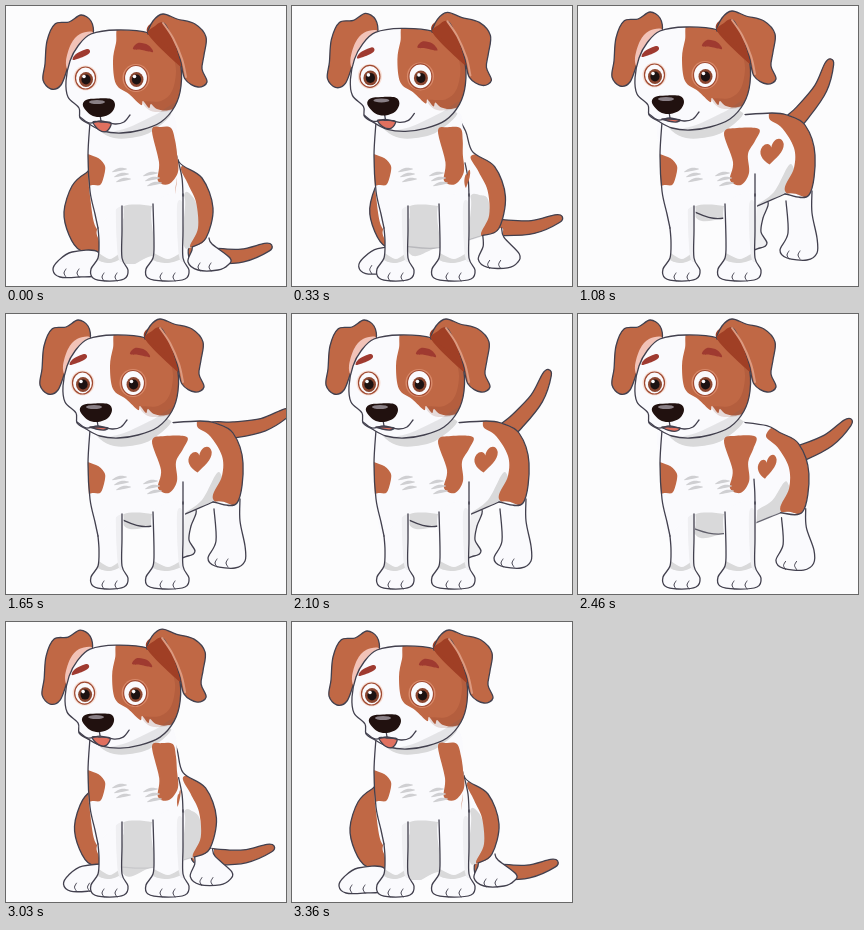
Write an HTML page with a canvas that moves like this. It is 280 by 280 pixels and loops after 3390 ms.

```html
<!DOCTYPE html>
<html lang="en">
<head>
<meta charset="utf-8">
<title>Puppy</title>
<style>
html, body { margin: 0; width: 100%; height: 100%; overflow: hidden; background: #fcfcfd; }
canvas { display: block; width: 100vw; height: 100vh; }
</style>
</head>
<body>
<canvas id="stage"></canvas>
<script>
const LOOP = 3390, UP_END = 1080, DOWN_START = 2110, DOWN_END = 3290, WAG = 1130;
const INK = '#42404e', BROWN = '#c06845', DARK = '#a03f25', RED = '#9f3a30', GREY = '#d9d9da', WHITE = '#fafafd';

const canvas = document.getElementById('stage');
const g = canvas.getContext('2d');
const ratio = Math.max(1, window.devicePixelRatio || 1);
canvas.width = canvas.height = 280 * ratio;

const clamp = (x, lo, hi) => Math.min(hi, Math.max(lo, x));
const ease = u => (1 - Math.cos(Math.PI * clamp(u, 0, 1))) / 2;
const mix = ([a, b], k) => a.map((v, i) => v + (b[i] - v) * k);

// Each part of the hindquarters: [sitting, standing].
const torso = [
  [110,120, 162,104, 168,130, 173,156, 196,172, 207,202, 200,232, 186,241, 146,250, 114,250],
  [110,120, 162,109, 194,107, 209,109, 227,119, 237,149, 231,189, 207,188, 146,212, 114,205]
];
const rump = [
  [176,160, 207,165, 216,205, 204,238, 190,243, 184,240, 192,222, 190,196, 182,178],
  [191,112, 200,100, 245,120, 245,185, 230,196, 207,185, 216,162, 216,142, 204,122]
];
const hindLeg = [
  [203,232, 206,238, 224,252, 222,259, 212,264, 192,264, 182,256, 186,244, 186,238],
  [234,185, 234,207, 239,232, 239,247, 229,254, 209,252, 202,244, 210,227, 208,195]
];
const shoulder = [
  [146,124, 155,121, 165,122, 169,134, 171,148, 172,166, 163,178, 152,175, 153,156],
  [146,127, 159,122, 181,123, 177,135, 170,148, 171,167, 163,179, 152,174, 155,156]
];
const flank = [
  [178,190, 186,190, 192,205, 192,235, 178,240],
  [176,202, 196,186, 213,158, 218,195, 176,215]
];

// Smooth curve through a flat list of points.
function trace(p, closed = true) {
  const n = p.length / 2;
  const at = i => {
    i = closed ? (i + n) % n : clamp(i, 0, n - 1);
    return [p[2 * i], p[2 * i + 1]];
  };
  g.beginPath();
  g.moveTo(p[0], p[1]);
  for (let i = 0; i < (closed ? n : n - 1); i++) {
    const [a, b, c, d] = [at(i - 1), at(i), at(i + 1), at(i + 2)];
    g.bezierCurveTo(b[0] + (c[0] - a[0]) / 6, b[1] + (c[1] - a[1]) / 6,
      c[0] - (d[0] - b[0]) / 6, c[1] - (d[1] - b[1]) / 6, c[0], c[1]);
  }
}
function fill(p, color) {
  trace(p);
  g.fillStyle = color;
  g.fill();
}
function line(p, color = INK, width = 1.3, closed = false) {
  trace(p, closed);
  g.strokeStyle = color;
  g.lineWidth = width;
  g.stroke();
}
function shape(p, color) {
  fill(p, color);
  line(p, INK, 1.3, true);
}
function inside(p, draw) {
  g.save();
  trace(p);
  g.clip();
  draw();
  g.restore();
}
function shifted(x, y, draw) {
  g.save();
  g.translate(x, y);
  draw();
  g.restore();
}
function oval(x, y, rx, ry, color) {
  g.beginPath();
  g.ellipse(x, y, rx, ry, 0, 0, 7);
  g.fillStyle = color;
  g.fill();
}
function toes(x, y, gap) {
  for (const dx of [0, gap]) line([x + dx, y, x + dx - 2, y - 4, x + dx, y - 8], INK, 1);
}

// Tapered tail: it lifts late in the rise, then swings down and back once.
function drawTail(t, p) {
  const swing = ease(Math.abs(clamp(t, UP_END, UP_END + WAG) - UP_END - WAG / 2) / (WAG / 2));
  const raised = 13 + 43 * swing;
  const a = (4 + (raised - 4) * p ** 3.4) * Math.PI / 180;
  const [x, y] = mix([[193, 247], [214, 115]], p);
  g.save();
  g.translate(x, y);
  g.rotate(-a);
  shape([-8, -8, 14, -4, 42, -1, 66, -5, 73, -3, 70, 3, 44, 12, 14, 12, -8, 8], BROWN);
  g.restore();
}

function drawHeart(p) {
  const [x, y, sx, sy] = mix([[170, 180, .02, .7], [194, 145, 1.1, 1.15]], p);
  g.save();
  g.translate(x, y);
  g.rotate(.1);
  g.scale(sx, sy);
  g.beginPath();
  g.moveTo(-1, 12);
  g.bezierCurveTo(-8, 9, -13, 3, -9, -3);
  g.bezierCurveTo(-6, -7, -2, -6, -1, -3);
  g.bezierCurveTo(0, -12, 8, -14, 10, -7);
  g.bezierCurveTo(11, 0, 4, 6, -1, 12);
  g.fillStyle = BROWN;
  g.fill();
  g.restore();
}

function drawBack(t, p) {
  const body = mix(torso, p), leg = mix(hindLeg, p);
  drawTail(t, p);

  // The far hind leg passes behind the front legs on the way up.
  shifted(-90 * (1 - p), 0, () => {
    shape([174,192, 190,196, 185,212, 183,226, 189,237, 182,242, 170,240], '#f0f0f2');
  });
  shifted(92 * p, -16 * p, () => {
    if (p > .5) return;
    shape([92,164, 80,167, 66,180, 58,206, 63,229, 74,244, 95,244], BROWN);
    shape([92,246, 66,246, 52,255, 47,264, 54,271, 72,271, 92,268], WHITE);
    toes(60, 271, 13);
  });

  fill(leg, WHITE);
  line(leg);
  toes(leg[10] + 2, leg[11] + 1, 11);
  fill(body, WHITE);
  inside(body, () => {
    g.fillStyle = GREY;
    g.fillRect(114, 198, 34, 60);
    fill(mix(flank, p), GREY);
    fill(mix(rump, p), BROWN);
  });
  line(body.slice(2, 16));
  g.globalAlpha = p;
  line(body.slice(14));
  g.globalAlpha = 1;
}

function frontLeg(l, r, topL, topR) {
  const m = (l + r) / 2;
  const outline = [l, topL, l + 1, 236, l, 252, l - 7, 263, l - 5, 272, m - 4, 275, r + 2, 273, r + 6, 264, r, 252, r, 225, r, topR];
  fill(outline, WHITE);
  inside(outline, () => {
    fill([l, 247, m, 253, r, 246, r, 252, m, 257, l, 254], GREY);
    fill([r - 6, 200, r, 200, r + 2, 250, r - 4, 250], '#efeff2');
  });
  line(outline);
  toes(m - 6, 275, 13);
}

function drawFur(x, y) {
  for (let i = 0; i < 3; i++) {
    const dx = x + i * 2, dy = y + i * 5;
    fill([dx, dy + 3, dx + 7, dy - 1, dx + 15, dy, dx + 8, dy + 2], '#cfcfd2');
  }
}

function drawFront(p) {
  const chest = [86,110, 82,150, 84,190, 92,224, 116,215, 118,200, 146,200, 164,210, 178,192, 171,150, 162,105];
  fill(chest, WHITE);
  frontLeg(92, 116, 222, 200);
  frontLeg(147, 177, 198, 188);
  inside(chest, () => {
    fill([84,108, 94,125, 108,132, 124,132, 145,126, 166,106, 150,92, 100,100], GREY);
    fill([76,150, 90,151, 98,158, 99,165, 95,178, 88,179, 76,177], BROWN);
  });
  line([84,116, 82,150, 84,185, 89,208, 92,222]);
  line(mix([[172,154, 176,172, 177,190], [177,168, 177,180, 177,190]], p));
  fill(mix(shoulder, p), BROWN);
  drawHeart(p);
  drawFur(106, 163);
  drawFur(137, 167);
}

function drawEye(x, y, r, rim) {
  oval(x, y, r + 2, r + 2.5, rim);
  oval(x, y, r, r + 1, WHITE);
  g.strokeStyle = '#a04930';
  g.lineWidth = 1.2;
  g.stroke();
  oval(x + .5, y + 1.5, 7, 7.4, '#8a4630');
  oval(x + .5, y + 1.5, 4.6, 5, '#1c1212');
  oval(x - 1.5, y - 1.5, 1.8, 1.8, WHITE);
}

function drawHead(open) {
  const skull = [82,25, 108,21, 140,24, 160,36, 171,54, 172,77, 166,97, 152,113, 132,121, 112,124, 94,122, 80,115, 71,109, 70,99, 59,88, 57,72, 61,52, 69,37];
  const earL = [84,25, 82,12, 72,6, 60,13, 46,15, 38,32, 36,55, 34,71, 42,80, 52,76, 59,58, 64,46, 74,30];
  const earR = [139,25, 144,12, 154,5, 168,10, 186,15, 197,28, 195,46, 193,60, 198,73, 189,78, 176,70, 171,50, 162,28, 154,14];

  shape(earL, BROWN);
  fill([84,24, 71,25, 62,35, 57,52, 60,60, 72,42], '#f2c3b8');
  fill(skull, WHITE);
  inside(skull, () => {
    const patch = [112,15, 150,15, 182,50, 178,92, 160,101, 148,100, 142,95, 140,99, 134,92, 132,96, 120,85, 107,75, 104,52, 107,34];
    fill(patch, BROWN);
    fill([164,40, 180,60, 176,95, 146,103, 134,93, 152,92, 163,82, 167,62], 'rgba(120,45,25,.16)');
    fill([94,126, 118,119, 146,106, 168,94, 166,118, 130,132], 'rgba(90,90,100,.14)');
  });
  line(skull, INK, 1.3, true);

  fill([139,25, 146,12, 155,14, 164,30, 171,50, 172,58], DARK);
  shape(earR, BROWN);
  fill([139,25, 146,17, 154,14, 164,30, 171,52, 171,56, 158,38], DARK);
  line([154,14, 164,29, 173,50, 177,68], '#dc9a80', 2);

  fill([64,51, 67,45, 78,40, 81,43, 76,47], RED);
  fill([124,40, 129,34, 139,36, 144,43, 133,41], RED);
  drawEye(76.5, 69, 10, '#f6ded5');
  drawEye(127, 69, 11.5, '#d98a6a');

  const d = 6 * open;
  shape([84, 113, 92, 113, 102, 114, 98, 116 + d, 90, 115 + d], '#e0705f');
  line([71,108, 80,114, 92,112, 106,115, 115,113, 121,106]);
  line([91,106, 92,112]);
  fill([74,97, 77,91, 88,89.5, 102,90, 106,96, 102,104, 92,108, 82,106], '#21110f');
  oval(88, 93, 8, 2, '#8a8086');
}

function render(t) {
  const p = ease(t / UP_END) - ease((t - DOWN_START) / (DOWN_END - DOWN_START));
  const sunk = 1 - Math.sin(Math.min(1, p / .6) * Math.PI / 2);
  g.setTransform(ratio, 0, 0, ratio, 0, 0);
  g.lineCap = g.lineJoin = 'round';
  g.fillStyle = '#fcfcfd';
  g.fillRect(0, 0, 280, 280);
  drawBack(t, p);
  drawFront(p);
  shifted(3 * sunk, 3 * sunk, () => drawHead(1 - p));
}

const start = performance.now();
function tick() {
  render((performance.now() - start) % LOOP);
  requestAnimationFrame(tick);
}
tick();
</script>
</body>
</html>
```
